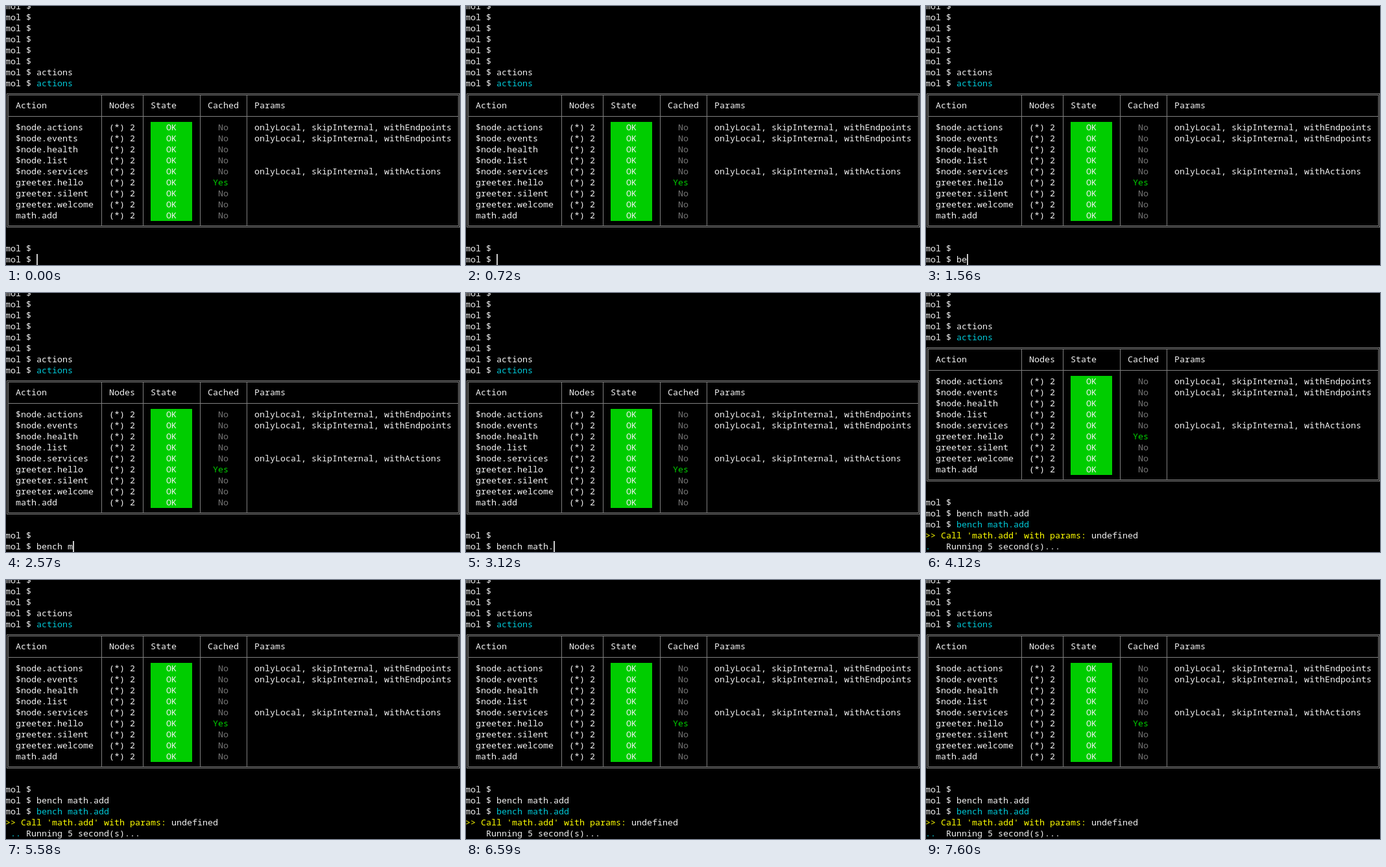
These frames come from a looping animation (700x400 px, 8000 ms). An HTML page:

```html
<!DOCTYPE html>
<html lang="en">
<head>
<meta charset="utf-8">
<title>Terminal</title>
<style>
  html, body { margin: 0; width: 100%; height: 100%; overflow: hidden; background: #000; }
  svg { display: block; }
  text { font: 13.333px "Noto Sans Mono", "DejaVu Sans Mono", monospace; white-space: pre; fill: #f2f2f2; }
  .cyan { fill: #00c8d7; }
  .green { fill: #00cd00; }
  .grey { fill: #767676; }
  .yellow { fill: #ff0; }
  .lines { fill: none; stroke: #808080; shape-rendering: crispEdges; }

  #scene, #caret, #bar, .dot { animation: 8s step-end infinite; }
  #scene { animation-name: scroll; }
  #caret { animation-name: type; }
  #bar { animation-name: blink; }
  .dot0 { animation-name: dot0 !important; }
  .dot1 { animation-name: dot1 !important; }
  .dot2 { animation-name: dot2 !important; }

  @keyframes scroll {
    0% { transform: none; }
    51.5%, 100% { transform: translateY(-51px); }
  }
  @keyframes type {
    0% { transform: translateX(0); }
    16.625% { transform: translateX(8px); }
    19.5% { transform: translateX(16px); }
    21.375% { transform: translateX(24px); }
    22.375% { transform: translateX(32px); }
    25.25% { transform: translateX(40px); }
    26.25% { transform: translateX(48px); }
    32.125% { transform: translateX(56px); }
    33% { transform: translateX(64px); }
    36.875% { transform: translateX(72px); }
    37.938% { transform: translateX(80px); }
    39% { transform: translateX(88px); }
    40.875% { transform: translateX(96px); }
    43.75% { transform: translateX(104px); }
    45.625%, 100% { transform: translateX(112px); }
  }
  @keyframes blink {
    0%, 9%, 16.625% { opacity: 1; }
    2.125%, 15.625%, 51.5%, 100% { opacity: 0; }
  }
  @keyframes dot0 {
    0%, 89.25%, 100% { opacity: 1; }
    69.75% { opacity: 0; }
  }
  @keyframes dot1 {
    0%, 76.625% { opacity: 0; }
    58.25%, 95%, 100% { opacity: 1; }
  }
  @keyframes dot2 {
    0%, 82.375%, 100% { opacity: 0; }
    64% { opacity: 1; }
  }
</style>
</head>
<body>
<svg width="700" height="400" viewBox="0 0 700 400">
  <g id="scene">
    <rect x="223" y="179" width="64" height="153" fill="#00cd00"/>
    <g class="lines">
      <rect x="1.5" y="135.5" width="698" height="206"/>
      <rect x="3.5" y="137.5" width="694" height="202"/>
      <path d="M3 170.5H698M147.5 137V340M211.5 137V340M299.5 137V340M371.5 137V340"/>
    </g>
    <g id="output"></g>
    <g id="caret">
      <rect x="47" y="383" width="653" height="17"/>
      <rect id="bar" x="47" y="383" width="2" height="17" fill="#ccc"/>
    </g>
  </g>
</svg>
<script>
  const output = document.getElementById('output');

  // Places text on the 8 x 17 character grid.
  function put(col, row, str, cls = '') {
    const el = document.createElementNS('http://www.w3.org/2000/svg', 'text');
    el.setAttribute('x', col * 8 - 1);
    el.setAttribute('y', row * 17 + 5);
    el.setAttribute('class', cls);
    el.textContent = str;
    output.append(el);
  }

  function prompt(row, command = '', cls) {
    put(0, row, 'mol $');
    if (command) put(6, row, command, cls);
  }

  for (let row = 0; row < 6; row++) prompt(row);
  prompt(6, 'actions');
  prompt(7, 'actions', 'cyan');

  const columns = [2, 20, 28, 39, 48];
  ['Action', 'Nodes', 'State', 'Cached', 'Params'].forEach((name, i) => put(columns[i], 9, name));

  const actions = [
    ['$node.actions', 'onlyLocal, skipInternal, withEndpoints'],
    ['$node.events', 'onlyLocal, skipInternal, withEndpoints'],
    ['$node.health'],
    ['$node.list'],
    ['$node.services', 'onlyLocal, skipInternal, withActions'],
    ['greeter.hello'],
    ['greeter.silent'],
    ['greeter.welcome'],
    ['math.add']
  ];
  actions.forEach(([name, params = ''], i) => {
    const row = 11 + i;
    put(2, row, name);
    put(20, row, '(*) 2');
    put(31, row, 'OK');
    if (name === 'greeter.hello') put(40, row, 'Yes', 'green');
    else put(41, row, 'No', 'grey');
    put(48, row, params);
  });

  prompt(22);
  prompt(23, 'bench math.add');
  prompt(24, 'bench math.add', 'cyan');
  put(0, 25, ">> Call 'math.add' with params:", 'yellow');
  put(32, 25, 'undefined');
  for (let i = 0; i < 3; i++) put(i, 26, '.', `cyan dot dot${i}`);
  put(4, 26, 'Running 5 second(s)...');
</script>
</body>
</html>
```
